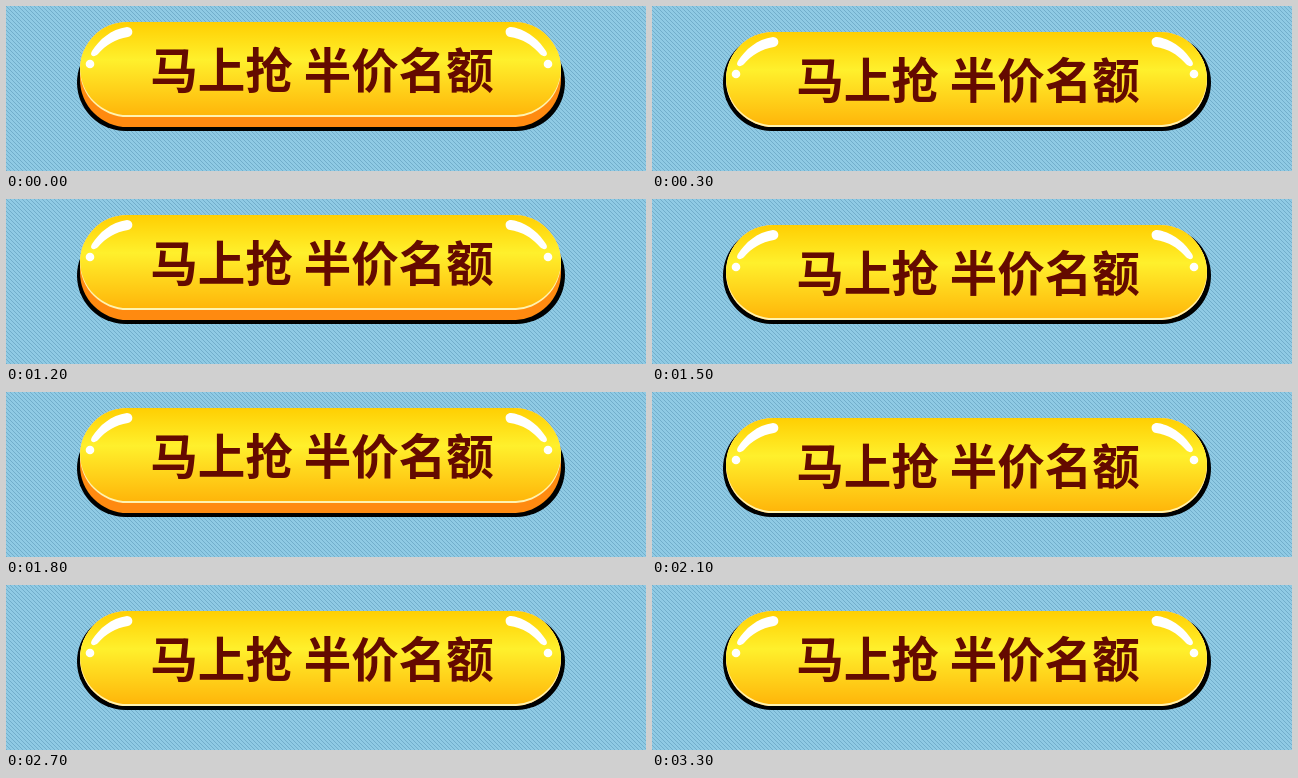
Write an HTML page that moves like this. It is 640 px wide and 165 px high and loops after 3.6 s.

```html
<!DOCTYPE html>
<html lang="zh-CN">
<head>
<meta charset="utf-8">
<style>
  html, body { margin: 0; width: 100%; height: 100%; overflow: hidden; }
  svg { display: block; width: 640px; height: 165px; }
  text { font: 700 47.5px "Noto Sans CJK SC", "Noto Sans CJK", sans-serif; }
</style>
</head>
<body>
<svg viewBox="0 0 640 165">
  <defs>
    <pattern id="stripes" width="4" height="4" patternUnits="userSpaceOnUse">
      <rect width="4" height="4" fill="#8fcae4"/>
      <path d="M-1 -1L5 5M-1 3L1 5M3 -1L5 1" stroke="#72aecb" stroke-width="1"/>
    </pattern>
    <linearGradient id="gold" x2="0" y2="1">
      <stop offset="0" stop-color="#ffcd00"/>
      <stop offset=".42" stop-color="#fff02c"/>
      <stop offset="1" stop-color="#ffb60a"/>
    </linearGradient>
    <clipPath id="faceShape"><rect x="74" y="16" width="481" height="95" rx="47.5"/></clipPath>
    <g id="shine" fill="#fff">
      <path d="M86 45C93 34 105 23 121 21C128 21 128 30 122 31C109 33 100 39 92 48C88 52 83 50 86 45Z"/>
      <circle cx="84" cy="58" r="4.3"/>
    </g>
  </defs>
  <rect width="640" height="165" fill="url(#stripes)"/>
  <rect x="71" y="28" width="488" height="97" rx="48.5"/>
  <rect id="side" x="74" y="16" width="481" height="105" rx="47.5" fill="#ff8a10"/>
  <g id="face">
    <g clip-path="url(#faceShape)">
      <rect x="74" y="16" width="481" height="95" fill="#fff3b0"/>
      <rect x="74" y="14" width="481" height="95" rx="47.5" fill="url(#gold)"/>
    </g>
    <use href="#shine"/>
    <use href="#shine" transform="matrix(-1 0 0 1 626 0)"/>
    <text x="316" y="82" text-anchor="middle" fill="#640a00">马上抢 半价名额</text>
  </g>
</svg>
<script>
  const HOLD = 300, PRESS = 10;
  const face = document.getElementById("face");
  const side = document.getElementById("side");

  function draw(now) {
    const drop = Math.floor(now / HOLD) % 2 * PRESS;
    face.setAttribute("transform", `translate(0 ${drop})`);
    side.setAttribute("y", 16 + drop);
    side.setAttribute("height", 105 - drop);
    requestAnimationFrame(draw);
  }
  draw(performance.now());
</script>
</body>
</html>
```
